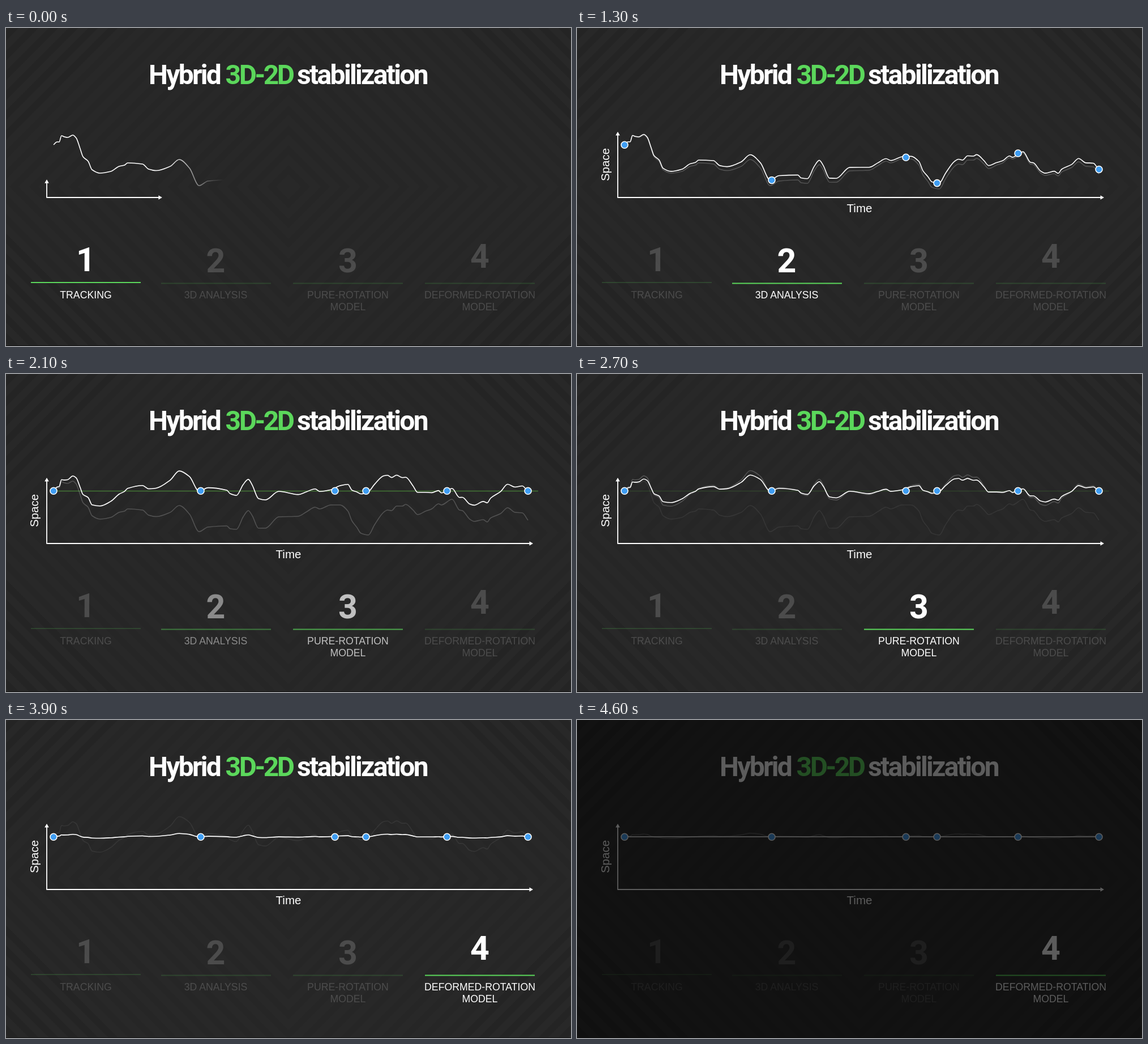
Animation of 998x561 px, one loop 5100 ms. Source, as an HTML page:

```html
<!DOCTYPE html>
<html lang="en">
<head>
<meta charset="utf-8">
<title>Hybrid 3D-2D stabilization</title>
<style>
html, body { margin: 0; width: 100%; height: 100%; overflow: hidden; background: #070707; }
svg { display: block; width: 100vw; height: 100vh; }
.title { font: 700 48px Roboto, sans-serif; letter-spacing: -2.7px; fill: #fff; }
.number { font: 700 59px Roboto, sans-serif; fill: #fff; text-anchor: middle; }
.label { font: 17.7px "Liberation Sans", sans-serif; fill: #fff; text-anchor: middle; }
.axis { font: 20.5px "Liberation Sans", sans-serif; fill: #fff; text-anchor: middle; }
.line { fill: none; stroke: #fff; stroke-width: 1.6; stroke-linejoin: round; }
</style>
</head>
<body>
<svg viewBox="0 0 998 561">
  <defs>
    <linearGradient id="wipe" gradientUnits="userSpaceOnUse" y1="0" y2="0">
      <stop offset="0" stop-color="#fff"/>
      <stop offset="1" stop-color="#fff" stop-opacity="0"/>
    </linearGradient>
  </defs>
  <g id="stage">
    <rect width="998" height="561" fill="#282828"/>
    <g id="stripes" fill="none" stroke="#000" stroke-width="12"></g>
    <rect y="560" width="998" height="1" fill="#131313"/>
    <g class="title">
      <text x="252" y="99">Hybrid</text>
      <text x="387.5" y="99" fill="#5bd75b" style="letter-spacing:-3.4px">3D-2D</text>
      <text x="514" y="99">stabilization</text>
    </g>
    <path id="guide" d="M78 206.5H940" stroke="#5bb840" stroke-width="1.4"/>
    <g id="ghosts"></g>
    <path id="axes" class="line" style="stroke-width:1.8"/>
    <path id="arrows" fill="#fff"/>
    <g id="axisNames" class="axis">
      <text x="499" y="325">Time</text>
      <text transform="translate(57 241) rotate(-90)">Space</text>
    </g>
    <path id="curve" class="line" style="stroke:url(#wipe)"/>
    <g id="dots" fill="#3f9df2" stroke="#fff" stroke-width="1.6"></g>
    <g id="panels"></g>
  </g>
</svg>
<script>
const $ = id => document.getElementById(id);
const REST = 206, DIM = 0.17;

// Timeline: 35 poses, 100 ms each, some held longer.
const POSES = 35, STEP = 100, HOLD = 500, HELD = [7, 17, 26, 34];
const lengthOf = n => HELD.includes(n) ? HOLD : STEP;
const LOOP = POSES * STEP + HELD.length * (HOLD - STEP);

const track = [
  [84,206],[90,201],[94,201],[98,190],[103,192],[109,193],[118,189],[124,194],[131,213],[136,227],
  [145,235],[152,250],[166,256],[185,253],[200,244],[209,242],[215,238],[241,240],[252,249],[265,251.5],
  [290,244],[306,232],[324,247],[341,278],[357,270],[390,268],[396,273],[407,274],[419,252],[428,241],
  [435,250],[446,272],[458,272],[482,252],[516,251],[531,243],[546,235],[554,238],[574,231],[590,231],
  [604,242],[611,259],[620,271],[627,281],[640,284],[651,266],[667,244],[674,240],[681,241],[690,233],
  [700,233],[706,230],[719,240],[727,248],[741,242],[752,238],[764,229],[769,231],[788,221],[801,240],
  [806,241],[819,256],[827,260],[843,257],[850,261],[856,254],[874,246],[886,236],[899,244],[912,245],
  [922,258]
];
const keys = [[84,206],[344,278],[581,231.5],[636,284],[779,223],[922,256]];
const panels = [
  { x: 141, left: 44, lineY: 449, base: 429, text: ["TRACKING"] },
  { x: 370.5, left: 274, lineY: 450.5, base: 431, text: ["3D ANALYSIS"] },
  { x: 604, left: 507, lineY: 450.5, base: 431, text: ["PURE-ROTATION", "MODEL"] },
  { x: 837, left: 740, lineY: 450.5, base: 423, text: ["DEFORMED-ROTATION", "MODEL"] }
];

const mix = (a, b, p) => a + (b - a) * p;
const ramp = (t, from, to) => Math.min(1, Math.max(0, (t - from) / (to - from)));
const ease = (t, from, to) => { const p = ramp(t, from, to); return p * p * (3 - 2 * p); };

function add(parent, tag, attrs, text) {
  const node = document.createElementNS("http://www.w3.org/2000/svg", tag);
  for (const name in attrs) node.setAttribute(name, attrs[name]);
  if (text) node.textContent = text;
  return parent.appendChild(node);
}

// Distance of the key line from rest, linear between neighbouring keys.
function drift(x) {
  let i = 1;
  while (i < keys.length - 1 && keys[i][0] < x) i++;
  const [x0, y0] = keys[i - 1], [x1, y1] = keys[i];
  return mix(y0, y1, (x - x0) / (x1 - x0)) - REST;
}

// Monotone cubic through the points.
function smooth(points) {
  const slope = i => (points[i + 1][1] - points[i][1]) / (points[i + 1][0] - points[i][0]);
  const last = points.length - 1;
  const tangent = i => {
    if (i === 0) return slope(0);
    if (i === last) return slope(last - 1);
    const a = slope(i - 1), b = slope(i);
    return a * b > 0 ? 2 * a * b / (a + b) : 0;
  };
  let d = "M" + points[0];
  for (let i = 0; i < last; i++) {
    const [x0, y0] = points[i], [x1, y1] = points[i + 1], h = (x1 - x0) / 3;
    d += `C${x0 + h} ${y0 + h * tangent(i)} ${x1 - h} ${y1 - h * tangent(i + 1)} ${x1} ${y1}`;
  }
  return d;
}

const aligned = track.map(([x, y]) => [x, y - drift(x)]);
const calm = aligned.map(([x, y]) => [x, REST + (y - REST) * (y < REST ? 0.18 : 0.1)]);
const level = track.map(([x]) => [x, REST]);
const blend = (a, b, p) => a.map(([x, y], i) => [x, mix(y, b[i][1], p)]);

for (let r = 30; r < 790; r += 35) {
  add($("stripes"), "path", {
    d: `M${499 - r} 280L499 ${280 - r}L${499 + r} 280L499 ${280 + r}Z`,
    opacity: r > 560 ? 0.11 : 0.04
  });
}
const ghosts = [track, aligned, calm].map(points =>
  add($("ghosts"), "path", { class: "line", d: smooth(points) }));
const dots = keys.map(([x]) => add($("dots"), "circle", { cx: x }));
const groups = panels.map((panel, i) => {
  const group = add($("panels"), "g", {});
  add(group, "text", { class: "number", x: panel.x, y: panel.base }, String(i + 1));
  add(group, "path", {
    d: `M${panel.left} ${panel.lineY}h194`, stroke: "#5bd75b", "stroke-width": 2.2
  });
  panel.text.forEach((line, row) =>
    add(group, "text", { class: "label", x: panel.x, y: 476.5 + row * 21 }, line));
  return group;
});

function drawAxes(p) {
  const x = 72 + 859 * p, y = 299 - 116 * p ** 0.9;
  $("axes").setAttribute("d", `M72 ${y + 5}V299H${x - 5}`);
  $("arrows").setAttribute("d",
    `M72 ${y}l3.8 6.5h-7.6zM${x} 299l-6.5 -3.8v7.6z`);
}

function draw(t) {
  drawAxes(ease(t, -1.9, 4.1));
  $("axisNames").setAttribute("opacity", ramp(t, 1.5, 4.5));

  const front = 280 + 130 * t;
  $("wipe").setAttribute("x1", front);
  $("wipe").setAttribute("x2", front + 105);

  const align = ease(t, 7, 15.6);
  const settle = ease(t, 16.3, 24.3);
  const flatten = ease(t, 25.5, 33);
  let points = blend(track, aligned, align);
  if (settle) points = blend(points, calm, settle);
  if (flatten) points = blend(points, level, flatten);
  $("curve").setAttribute("d", smooth(points));

  const pop = ramp(t, 4.8, 7);
  dots.forEach((dot, i) => {
    dot.setAttribute("cy", mix(keys[i][1], REST, align) + 0.3);
    dot.setAttribute("r", 6 * pop);
    dot.setAttribute("opacity", pop);
  });

  const fades = [
    t > 7 ? 1 - ramp(t, 17, 20) : 0,
    t > 16 ? 1 - ramp(t, 25, 28) : 0,
    t > 25 ? 1 : 0
  ];
  ghosts.forEach((ghost, i) => ghost.setAttribute("opacity", 0.2 * fades[i]));
  $("guide").setAttribute("opacity", 0.55 * ramp(t, 13.5, 15.5) * (1 - ramp(t, 17, 20)));

  const turns = [1, ramp(t, 5.42, 7.42), ramp(t, 15.7, 17.7), ramp(t, 24, 26), 0];
  groups.forEach((group, i) =>
    group.setAttribute("opacity", mix(DIM, 1, turns[i] - turns[i + 1])));

  $("stage").setAttribute("opacity", t > 33 ? 0.34 : 1);
}

function poseAt(ms) {
  let pose = 0;
  while (pose < POSES - 1 && ms >= lengthOf(pose)) ms -= lengthOf(pose++);
  return pose;
}

const start = performance.now();
let shown = -1;
function tick() {
  const pose = poseAt((performance.now() - start) % LOOP);
  if (pose !== shown) draw(shown = pose);
  requestAnimationFrame(tick);
}
tick();
</script>
</body>
</html>
```
